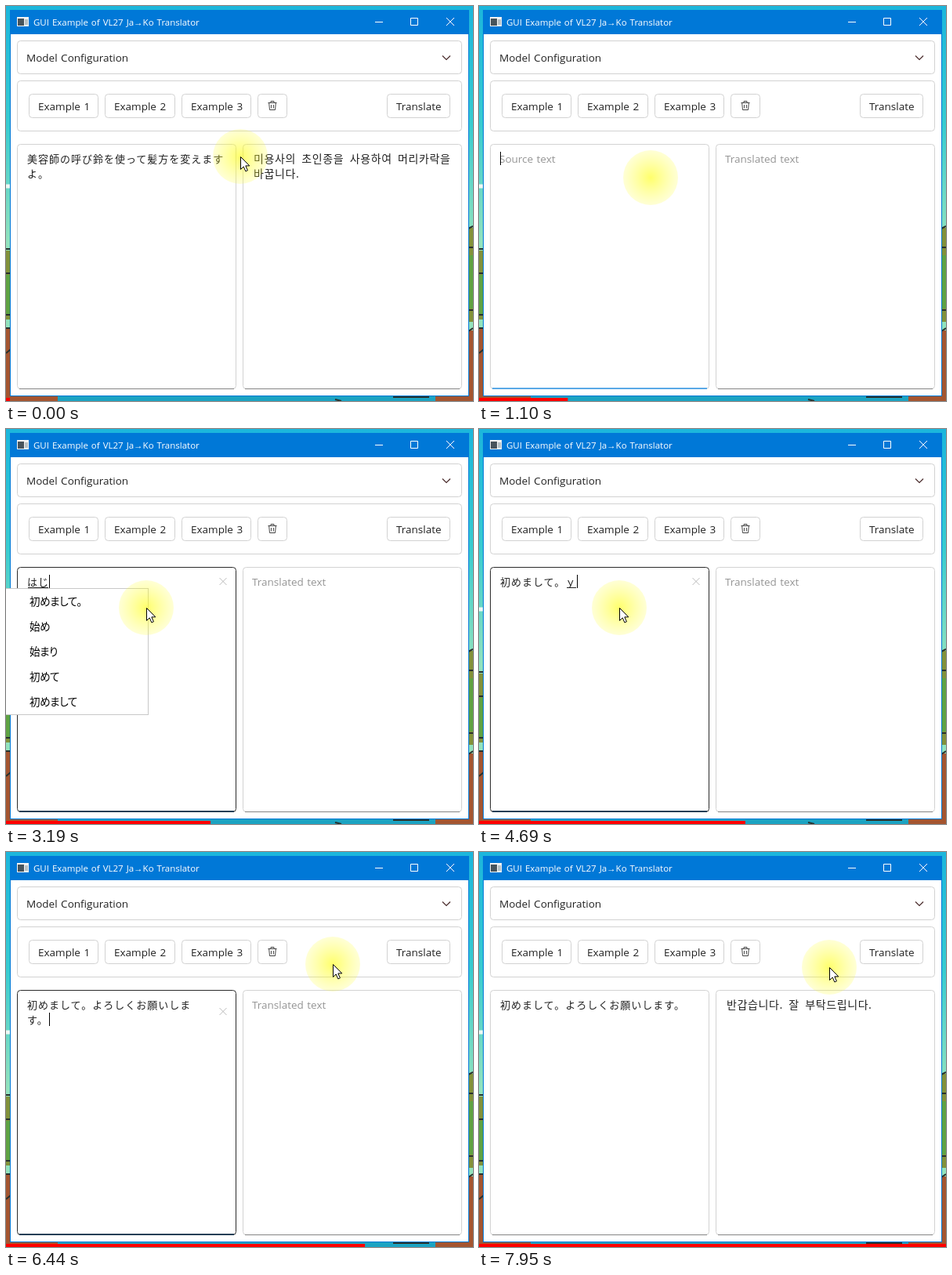
These frames come from a looping animation (596 by 504 pixels, 8950 ms). An HTML page:

```html
<!DOCTYPE html>
<html lang="ja">
<head>
<meta charset="utf-8">
<title>Translator demo</title>
<style>
html, body { margin: 0; width: 596px; height: 504px; overflow: hidden; }
svg { display: block; font: 13.5px 'Open Sans', sans-serif; word-spacing: 1px; }
text { fill: #222; white-space: pre; }
.hint { fill: #959595; }
.ja { font: 13px 'Noto Sans CJK JP', 'Noto Sans CJK', sans-serif; letter-spacing: 1px; word-spacing: 0; }
.ko { font: 14px 'Noto Sans CJK KR', 'Noto Sans CJK', sans-serif; letter-spacing: .6px; word-spacing: 3.7px; }
.pick { font: 13.5px 'Noto Sans CJK JP', 'Noto Sans CJK', sans-serif; font-feature-settings: 'palt'; letter-spacing: -.4px; fill: #000; }
.title { font-size: 11.5px; fill: #fff; }
.box { fill: #fff; stroke: #d2d2d2; }
.line { fill: none; stroke: #444; }
</style>
</head>
<body>
<svg width="596" height="504" viewBox="0 0 596 504">
  <defs>
    <linearGradient id="sky" x2="0" y2="1">
      <stop offset="0" stop-color="#1bb6dc"/>
      <stop offset=".3" stop-color="#38cbd0"/>
      <stop offset=".6" stop-color="#92e2bd"/>
    </linearGradient>
    <radialGradient id="glow">
      <stop offset="0" stop-color="#ffff00" stop-opacity=".58"/>
      <stop offset="1" stop-color="#ffff30" stop-opacity=".2"/>
    </radialGradient>
  </defs>

  <!-- desktop -->
  <rect width="596" height="504" fill="url(#sky)"/>
  <path d="M0 230h5" stroke="#eef8f4" stroke-width="5"/>
  <path d="M0 312h6v88H0zM590 283h6v120h-6z" fill="#82913a"/>
  <path d="M0 343h6v50H0zM590 318h6v68h-6z" fill="#5fa243"/>
  <path d="M0 410h6v94H0zM590 414h6v90h-6z" fill="#a45530"/>
  <path d="M0 497h66v7H0zM548 497h48v7h-48z" fill="#a45530"/>
  <path d="M66 497h482v7H66z" fill="#1ba3c2"/>
  <path d="M0 310h6M0 341h6M0 394h6M0 411h6M0 443l6-5M590 284l6-3M590 308h6M590 388h6M590 415l6-4M420 502l8 2M494 499h46" stroke="#28302c" stroke-width="2"/>

  <!-- window -->
  <rect x="5" y="5" width="586" height="493" fill="#0078d7"/>
  <rect x="6" y="36" width="584" height="461" fill="#fff"/>
  <rect x="14" y="14" width="15" height="12" fill="#f3f3f3"/>
  <path d="M15 16h8v9h-8z" fill="#47545c"/>
  <path d="M24 17h4v7h-4z" fill="#b8c2c6"/>
  <text class="title" x="35" y="25">GUI Example of VL27 Ja→Ko Translator</text>
  <path d="M471 20.5h10M516.5 15.5h9v9h-9zM562 15l10 10M572 15l-10 10" fill="none" stroke="#fff"/>
  <rect class="box" x="14.5" y="44.5" width="567" height="42" rx="4"/>
  <text x="26" y="71">Model Configuration</text>
  <path d="M557 63.5l5 5 5-5" class="line" style="stroke:#4a2c2c;stroke-width:1.2"/>
  <rect class="box" x="14.5" y="95.5" width="567" height="64" rx="4"/>
  <g id="buttons"></g>
  <path class="line" d="M334.5 123.5h11M338 123v-1.5h4v1.5M335.7 124l.8 8.5h7l.8-8.5M338.6 126v4.5M341.4 126v4.5"/>
  <g id="live"></g>
</svg>
<script>
const LOOP = 8950;
const $ = id => document.getElementById(id);
const text = (s, x, y, cls = '') => `<text class="${cls}" x="${x}" y="${y}">${s}</text>`;
const rect = (x, y, w, h, attrs) => `<rect x="${x}" y="${y}" width="${w}" height="${h}" ${attrs}/>`;
const path = (d, attrs) => `<path d="${d}" ${attrs}/>`;
const within = (t, spans) => spans.some(([a, b]) => t >= a && t < b);

$('buttons').innerHTML = [
  [29, 89, 'Example 1'], [126, 90, 'Example 2'], [224, 89, 'Example 3'], [321, 38, ''], [486, 81, 'Translate']
].map(([x, w, s]) => rect(x + .5, 112.5, w - 1, 30, 'class="box" rx="4"') + text(s, x + 12, 133)).join('');

// The screen is sampled in bursts: first time, last time, steps
const ticks = [
  [0, 0, 1], [100, 900, 9], [1000, 1800, 9], [2230, 2430, 3], [2590, 2790, 3], [3090, 3190, 2],
  [3400, 3520, 2], [3780, 3880, 2], [4020, 4120, 2], [4310, 4310, 1], [4690, 5090, 5], [5370, 5470, 2],
  [5620, 5720, 2], [5910, 5910, 1], [6240, 6740, 6], [6920, 7750, 9], [7850, 7950, 2]
].flatMap(([a, b, n]) => Array.from({ length: n }, (_, k) => a + (b - a) * k / Math.max(1, n - 1)));

const hello = '初めまして。', regards = 'よろしくお願いします。';
const picks = {
  ha: ['はい。', 'はい', '初めて', '春', '早く'],
  haji: [hello, '始め', '始まり', '初めて', '初めまして'],
  yo: [regards, '良い', '夜', '読む', '呼ぶ'],
  yoro: [regards, 'よろしく', '宜しく', '喜んで', 'よろしくね']
};

// time, text, focus (1 caret, 2 input method), composition start, picks, row chosen
const typing = [
  [0, '美容師の呼び鈴を使って髪方を変えますよ。', 0],
  [600, '', 0], [900, '', 1], [1600, 'h', 1], [1800, 'ha', 1],
  [2230, 'h', 1], [2330, '', 1], [2430, '', 2],
  [2590, 'ｈ', 2, 0], [2690, 'は', 2, 0, 'ha'],
  [3090, 'はｊ', 2, 0, 'ha'], [3190, 'はじ', 2, 0, 'haji'],
  [3400, 'はじｍ', 2, 0, 'haji'], [3520, 'はじめ', 2, 0, 'haji'],
  [3780, hello, 2, 0, 'haji', true], [4020, hello, 2],
  [4690, hello + 'ｙ', 2, 6], [4790, hello + 'よ', 2, 6, 'yo'],
  [4890, hello + 'よｒ', 2, 6, 'yo'], [4990, hello + 'よろ', 2, 6, 'yoro'],
  [5370, hello + regards, 2, 6, 'yoro', true], [5620, hello + regards, 2],
  [6920, hello + regards, 0]
];
const results = [
  [0, ['미용사의 초인종을 사용하여 머리카락을', '바꿉니다.']],
  [600, []],
  [7300, ['반갑습니다. 잘 부탁드립니다.']]
];
const route = [
  [0, 299, 192], [100, 300, 190], [500, 340, 129], [600, 340, 129], [900, 219, 219], [1200, 219, 219],
  [1500, 179, 228], [6140, 179, 228], [6440, 417, 143], [6740, 502, 126], [7130, 502, 126], [7750, 447, 147], [LOOP, 447, 147]
];
const latest = (list, t) => list.findLast(e => e[0] <= t);

function pointerAt(t) {
  const k = Math.max(1, route.findIndex(p => p[0] >= t));
  const [a, ax, ay] = route[k - 1], [b, bx, by] = route[k];
  const u = (t - a) / (b - a);
  return [ax + (bx - ax) * u, ay + (by - ay) * u];
}

function editor(x, focus) {
  const stroke = focus === 2 ? '#2b2b2b' : '#d2d2d2';
  const base = focus === 1 ? '#5aa9e6' : focus === 2 ? '#263f57' : '#858585';
  return rect(x + .5, 176.5, 279, 312, `fill="#fff" stroke="${stroke}" rx="4"`) +
    path(`M${x + 3} ${focus ? 488 : 488.5}h274`, `stroke="${base}" stroke-width="${focus ? 2 : 1}"`);
}

function sourceText(t, s, focus, from) {
  const latin = /^[a-z]/.test(s), perLine = focus ? 15 : 18;
  const lines = s.match(new RegExp(`.{1,${perLine}}`, 'g')) || [''];
  let out = s ? '' : text('Source text', 26, 200, 'hint');
  lines.forEach((line, r) => {
    out += text(line, 27, 200 + 19 * r, latin ? '' : 'ja');
    const start = r ? 0 : from;
    if (from >= 0 && line.length > start)
      out += path(`M${28 + 14 * start} ${202.5 + 19 * r}H${26 + 14 * line.length}`, 'stroke="#222"');
  });
  if (!focus) return out;
  const row = lines.length - 1;
  if (s) out += path(`M272.5 ${190 + 9 * row}l9 9m0-9l-9 9`, 'stroke="#bbb"');
  if (!within(t, [[1300, 1600], [4310, 4690], [5910, 6240]])) {
    const x = 27.5 + lines[row].length * (latin ? 8 : 14);
    out += path(`M${x} ${186 + 19 * row}v17`, 'stroke="#000"');
  }
  return out;
}

function popup(name, from, chosen) {
  if (!name) return '';
  const x = from ? 79 : -6;
  return rect(x + .5, 203.5, 187, 161, 'fill="#fff" stroke="#c8c8c8"') +
    (chosen ? rect(x + 1, 204, 186, 32, 'fill="#dcecf9"') : '') +
    picks[name].map((s, r) => text(s, x + 36, 225 + 32 * r, 'pick')).join('');
}

function pointer(t) {
  const [x, y] = pointerAt(t);
  let out = `<circle cx="${x}" cy="${y}" r="35" fill="url(#glow)"/>`;
  if (within(t, [[500, 700], [900, 1000], [6920, 7100]]))
    out += `<circle cx="${x + .5}" cy="${y}" r="5" fill="none" stroke="#f01400" stroke-width="4"/>`;
  if (!within(t, [[800, 2590]]))
    out += path(`M${x + .5} ${y + .5}v16l3.7-3.6 2.6 6 2.6-1.1-2.6-5.9h5z`, 'fill="#fff" stroke="#000"');
  return out;
}

function draw(i) {
  const t = ticks[i];
  const [, s, focus, from = -1, name, chosen] = latest(typing, t);
  const ko = latest(results, t)[1];
  $('live').innerHTML = editor(14, focus) + editor(302, 0) +
    sourceText(t, s, focus, from) +
    (ko.length ? ko.map((l, r) => text(l, 316, 200 + 19 * r, 'ko')).join('') : text('Translated text', 314, 200, 'hint')) +
    popup(name, from, chosen) + pointer(t) +
    rect(0, 500, 596 * (i + .5) / (ticks.length - .5), 4, 'fill="#f00"');
}

let shown = -1;
const began = performance.now();
function frame() {
  const t = (performance.now() - began) % LOOP;
  const i = ticks.findLastIndex(k => k <= t);
  if (i !== shown) draw(shown = i);
  requestAnimationFrame(frame);
}
frame();
</script>
</body>
</html>
```
